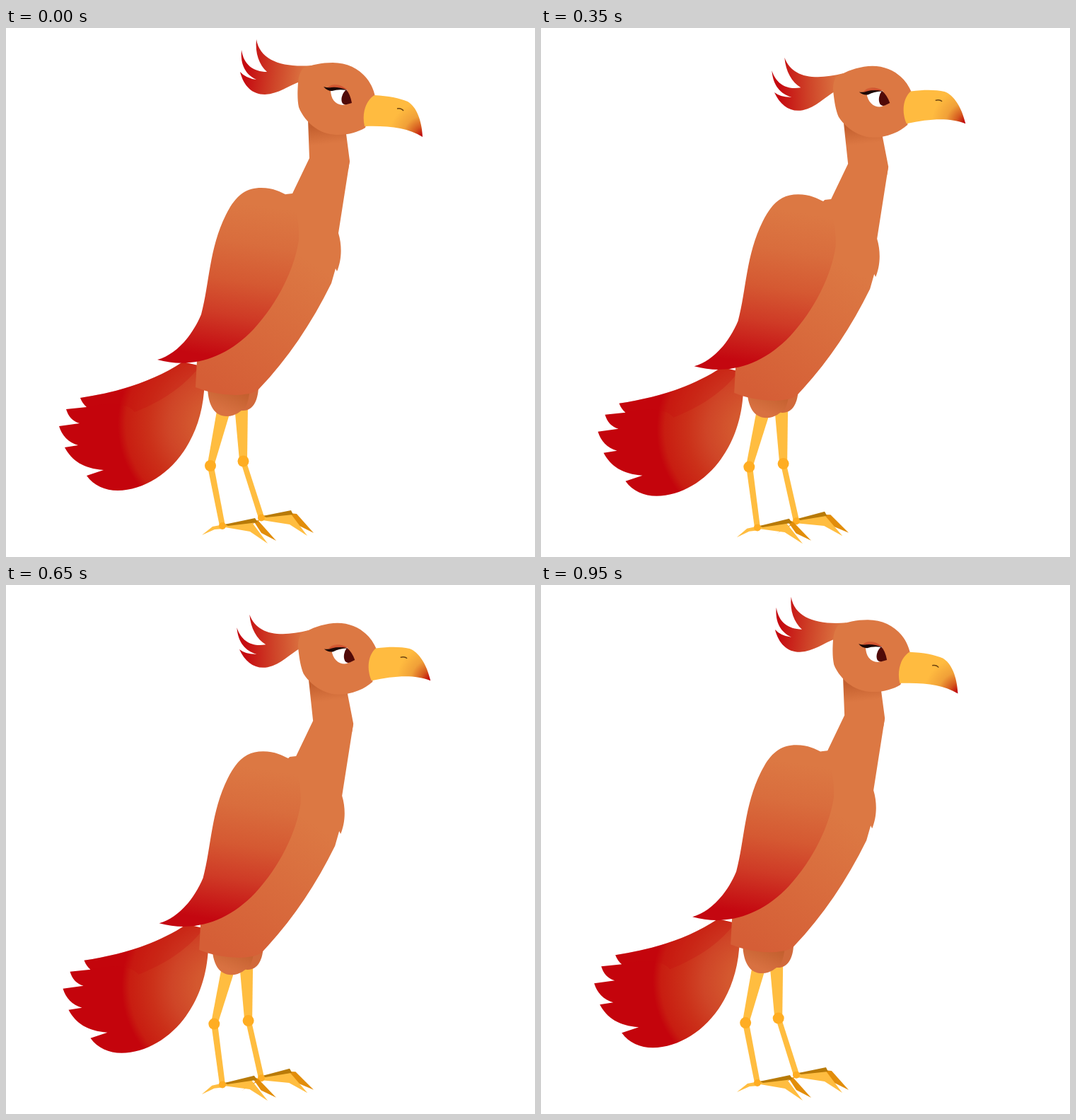
Write an HTML page that moves like this. It is 748 px wide and 748 px high and loops after 1000 ms.

```html
<!DOCTYPE html>
<html lang="en">
<head>
<meta charset="utf-8">
<title>Breathing bird</title>
<style>
html, body { margin: 0; height: 100%; overflow: hidden; background: #fff; }
svg { display: block; width: 100vw; height: 100vh; }
</style>
</head>
<body>
<svg viewBox="0 0 748 748">
<defs>
  <radialGradient id="tailFill" gradientUnits="userSpaceOnUse" cx="300" cy="560" r="142">
    <stop offset=".25" stop-color="#d4582f"/><stop offset=".5" stop-color="#cf4527"/>
    <stop offset=".7" stop-color="#cb3019"/><stop offset=".92" stop-color="#c81d11"/>
    <stop offset="1" stop-color="#c4040c"/>
  </radialGradient>
  <linearGradient id="wingFill" gradientUnits="userSpaceOnUse" x1="352" y1="250" x2="318" y2="468">
    <stop offset="0" stop-color="#dc7843"/><stop offset=".25" stop-color="#d96d3d"/>
    <stop offset=".5" stop-color="#d55932"/><stop offset=".72" stop-color="#cf3b26"/>
    <stop offset="1" stop-color="#c40710"/>
  </linearGradient>
  <linearGradient id="bodyFill" gradientUnits="userSpaceOnUse" x1="430" y1="330" x2="310" y2="515">
    <stop offset="0" stop-color="#dc7843"/><stop offset="1" stop-color="#d55e36"/>
  </linearGradient>
  <linearGradient id="thighFill" gradientUnits="userSpaceOnUse" x1="330" y1="515" x2="317" y2="545">
    <stop offset="0" stop-color="#c4602f"/><stop offset="1" stop-color="#d87141"/>
  </linearGradient>
  <linearGradient id="neckFill" gradientUnits="userSpaceOnUse" x1="452" y1="138" x2="455" y2="164">
    <stop offset="0" stop-color="#c4602f"/><stop offset="1" stop-color="#dc7843"/>
  </linearGradient>
  <linearGradient id="crestFill" gradientUnits="userSpaceOnUse" x1="340" y1="52" x2="425" y2="64">
    <stop offset="0" stop-color="#c50a10"/><stop offset=".5" stop-color="#cf4529"/>
    <stop offset="1" stop-color="#dc7843"/>
  </linearGradient>
  <radialGradient id="beakFill" gradientUnits="userSpaceOnUse" cx="591" cy="154" r="50">
    <stop offset=".06" stop-color="#bd0009"/><stop offset=".3" stop-color="#d5591f"/>
    <stop offset=".6" stop-color="#f0a038"/><stop offset="1" stop-color="#ffbb40"/>
  </radialGradient>
  <linearGradient id="lidFill" gradientUnits="userSpaceOnUse" x1="0" y1="76" x2="0" y2="88">
    <stop offset="0" stop-color="#dc7843"/><stop offset="1" stop-color="#c93a22"/>
  </linearGradient>
</defs>

<g id="tail">
  <path fill="url(#tailFill)" d="M105 523C158 515 208 500 250 472L285 480L280 514C273 600 214 653 158 654C140 654 124 647 114 633L138 625C110 623 93 612 83 593L102 590C88 586 79 576 75 563L104 559C94 556 88 549 85 539L114 536Q108 531 105 523Z"/>
  <path fill="#c40a0d" opacity=".25" d="M105 523C158 515 208 500 250 472L274 478C250 510 215 530 182 543Q168 525 114 536Z"/>
</g>

<g id="backFoot">
  <path fill="#e28d0a" d="M360 694L333 709L357 697ZM401 686L411 687L435 714L413 703Z"/>
  <path fill="#ffbd40" d="M361 690L402 686L426 718L401 702L363 696Z"/>
  <path fill="#b87a08" d="M363 690L403 682L406 688L368 692Z"/>
</g>
<path id="backShin" fill="#ffbd40"/>
<path id="backLeg" fill="#ffbd40"/>
<circle id="backKnee" r="8" fill="#ffad22"/>
<circle id="backAnkle" r="5" fill="#ffad22"/>

<g id="frontFoot">
  <path fill="#ffbd40" d="M308 702L292 705L277 717L295 709L308 708Z"/>
  <path fill="#e28d0a" d="M348 694L357 697L382 725L361 714Z"/>
  <path fill="#ffbd40" d="M308 702L347 698L370 729L345 712L310 706Z"/>
  <path fill="#b87a08" d="M309 702L352 693L356 699L314 704Z"/>
</g>
<path id="frontShin" fill="#ffbd40"/>
<path id="frontLeg" fill="#ffbd40"/>
<circle id="frontKnee" r="8" fill="#ffad22"/>
<circle id="frontAnkle" r="5" fill="#ffad22"/>

<path id="backThigh" fill="#d1693b" d="M318 500L357 500C358 525 350 541 335 541C326 541 318 530 318 500Z"/>
<path id="frontThigh" fill="url(#thighFill)" d="M285 500C284 532 294 549 312 549C326 549 331 541 338 538Q344 528 346 500Z"/>

<path id="body" fill="url(#bodyFill)" d="M429 184L486 188L470 290C476 310 474 330 468 344L466 340L460 361C432 418 398 468 358 510Q352 518 325 519Q295 519 268 508L270 470L330 300L396 235L405 234Z"/>
<path id="wing" fill="url(#wingFill)" d="M214 469C240 462 263 436 276 405C288 360 287 312 311 264C324 238 338 226 361 226C378 226 388 232 397 236C411 250 415 275 414 300C408 340 385 388 350 426C310 468 262 482 214 469Z"/>
<path id="neck" fill="url(#neckFill)"/>

<g id="head">
  <path fill="url(#crestFill)" d="M432 53C390 56 359 46 354 16C352 36 358 52 369 62C350 62 336 52 333 31C331 52 339 66 354 73Q339 71 331 62C336 82 348 94 366 94C386 93 398 82 418 75Z"/>
  <path fill="#dc7843" d="M413 77C412 92 412 102 414 112C418 123 428 135 437 141C448 149 460 151 470 151C485 151 498 147 508 141L522 97C516 68 492 49 462 49C446 49 432 52 420 57Q414 64 413 77Z"/>
  <path fill="url(#beakFill)" d="M521 95C541 96 556 99 568 104C580 111 588 130 589 154C568 141 541 138 507 139C503 122 508 103 521 95Z"/>
  <path fill="none" stroke="#6b4210" stroke-width="1.5" d="M553 114Q559 113 562 117"/>
  <path fill="url(#lidFill)" d="M455 84Q466 74 482 87Z"/>
  <path fill="#fff" d="M459 87C459 100 465 108 476 109L484 107L482 87Z"/>
  <path fill="#500a08" d="M481 87C476 92 473 99 475 105Q477 109 482 108L489 106Q487 94 481 87Z"/>
  <path fill="#1c0806" d="M449 83Q455 85 460 84Q471 83 482 88Q470 86 461 89Q454 89 449 83Z"/>
</g>
</svg>

<script>
const el = id => document.getElementById(id);

// Distance each rigid part travels: dx, dy, then angle and pivot.
const parts = {
  tail: [6.9, 9.8], body: [6.5, 10], wing: [3.3, 11.6],
  frontThigh: [8, 2.7], backThigh: [8.6, 3.8],
  head: [7, 7.6, -13, 455, 110],
  frontFoot: [0, 0, -2.4, 376, 727], backFoot: [0, 0, -4.5, 432, 714]
};

// Corners as x, y, dx, dy.
const shapes = {
  neck: [[427, 130, 1, 3], [480, 142, 2, 6], [486, 188, 6.5, 10], [484, 200, 6.5, 10], [429, 200, 6.5, 10], [429, 184, 6.5, 10]],
  frontLeg: [[299, 536, 8, 3], [319, 536, 8, 3], [295, 616, 6.7, 2], [285, 616, 6.7, 2]],
  frontShin: [[285, 620, 6.7, 2], [294, 620, 6.7, 2], [310, 704, 0, 3], [302, 704, 0, 3]],
  backLeg: [[323, 534, 9, 3], [342, 534, 9, 3], [341, 611, 9, 4.5], [330, 611, 9, 4.5]],
  backShin: [[332, 614, 9, 4.5], [340, 614, 9, 4.5], [365, 691, 0, 6], [357, 693, 0, 6]]
};

const joints = {
  frontKnee: [289, 619, 6.7, 2], backKnee: [335.5, 612.5, 9, 4.5],
  frontAnkle: [306, 704, 0, 3], backAnkle: [361, 692.5, 0, 6]
};

function draw(now) {
  const t = Math.floor(now % 1000 / 50) / 20;
  const p = (1 - Math.cos(2 * Math.PI * t)) / 2;
  const at = ([x, y, dx, dy]) => [x + dx * p, y + dy * p];

  for (const id in parts) {
    const [dx, dy, angle = 0, cx = 0, cy = 0] = parts[id];
    el(id).setAttribute("transform", `translate(${dx * p} ${dy * p}) rotate(${angle * p} ${cx} ${cy})`);
  }
  for (const id in shapes) el(id).setAttribute("d", "M" + shapes[id].map(at).join("L") + "Z");
  for (const id in joints) {
    const [x, y] = at(joints[id]);
    el(id).setAttribute("cx", x);
    el(id).setAttribute("cy", y);
  }
}

const start = performance.now();
function tick() {
  draw(performance.now() - start);
  requestAnimationFrame(tick);
}
tick();
</script>
</body>
</html>
```
